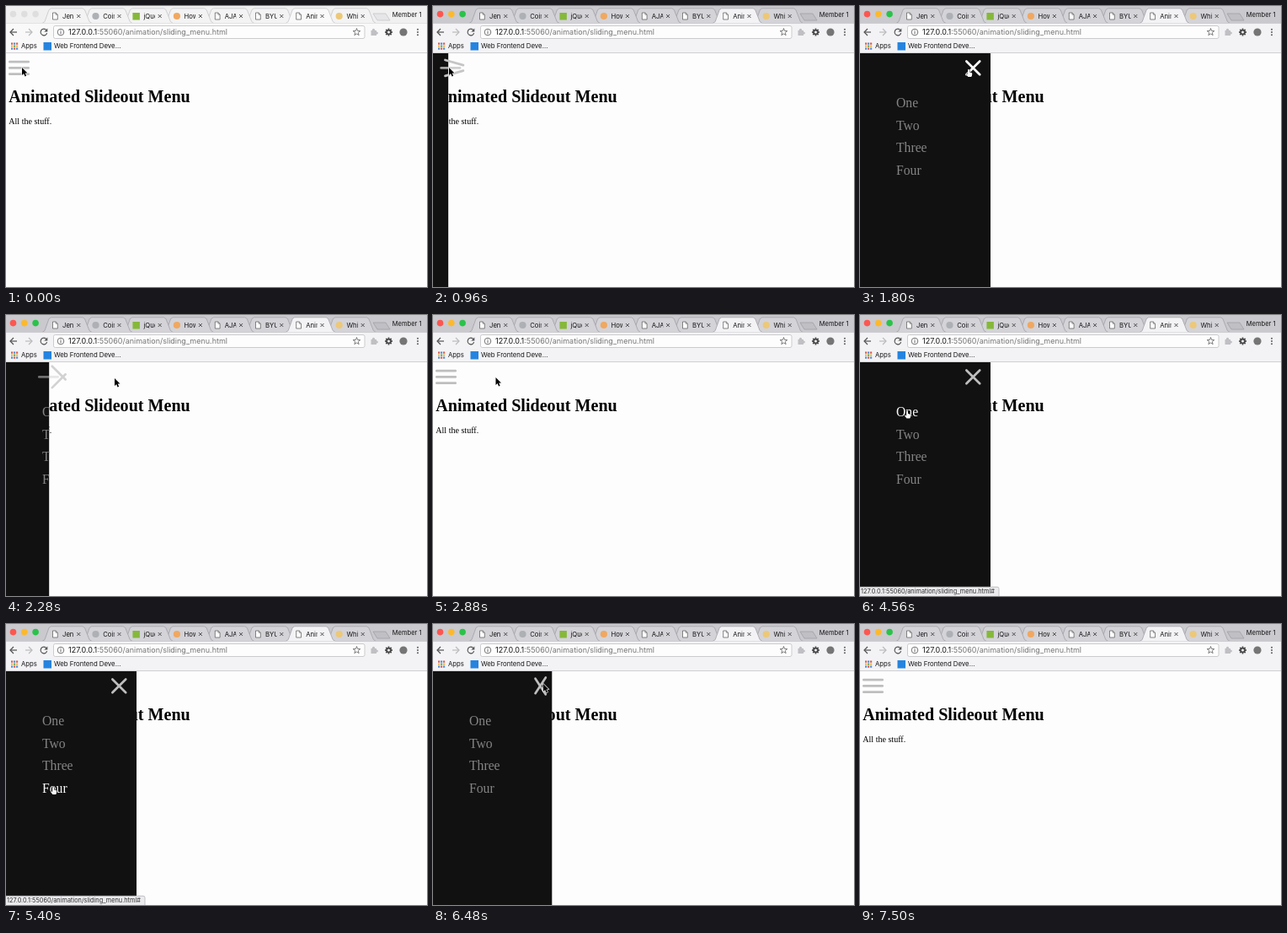
Recreate the animation shown at these times as an HTML page with a canvas. Size 500 by 333 pixels, loop 7560 ms.

```html
<!DOCTYPE html>
<html lang="en">
<head>
<meta charset="utf-8">
<title>Animated Slideout Menu</title>
<style>
html, body { margin: 0; width: 100%; height: 100%; overflow: hidden; background: #fdfdfd; }
canvas { display: block; width: 500px; height: 333px; }
</style>
</head>
<body>
<canvas id="stage"></canvas>
<script>
const W = 500, H = 333, LOOP = 7560, STEP = 60, SLIDE = 500, MENU_W = 155;
const UI = 'Inter, "Open Sans", sans-serif';
const SERIF = '"Liberation Serif", "Times New Roman", serif';
const INK = '#161616', MUTED = '#757575', GLYPH = '#525252';
const URL_HOST = '127.0.0.1', URL_PATH = ':55060/animation/sliding_menu.html';

const canvas = document.getElementById('stage');
const c = canvas.getContext('2d');
const dpr = window.devicePixelRatio || 1;
canvas.width = W * dpr;
canvas.height = H * dpr;

const clamp = v => Math.max(0, Math.min(1, v));
const lerp = (a, b, k) => a + (b - a) * k;
const smooth = k => k * k * (3 - 2 * k);

// Cubic bezier (.42, 0, .58, 1), solved by bisection
function easeInOut(x) {
  if (x <= 0 || x >= 1) return clamp(x);
  let lo = 0, hi = 1, s = 0.5;
  for (let i = 0; i < 18; i++) {
    s = (lo + hi) / 2;
    const bx = 3 * (1 - s) * (1 - s) * s * 0.42 + 3 * (1 - s) * s * s * 0.58 + s * s * s;
    if (bx < x) lo = s; else hi = s;
  }
  return s * s * (3 - 2 * s);
}

function gray(a, b, k) {
  const v = Math.round(lerp(a, b, k));
  return `rgb(${v},${v},${v})`;
}

function rect(x, y, w, h, fill) {
  c.fillStyle = fill;
  c.fillRect(x, y, w, h);
}

function disc(x, y, r, fill) {
  c.fillStyle = fill;
  c.beginPath();
  c.arc(x, y, r, 0, Math.PI * 2);
  c.fill();
}

function box(x, y, w, h, r, fill, stroke) {
  c.beginPath();
  c.roundRect(x, y, w, h, r);
  paint(fill, stroke);
}

function paint(fill, stroke, width = 0.8) {
  if (fill) { c.fillStyle = fill; c.fill(); }
  if (stroke) { c.strokeStyle = stroke; c.lineWidth = width; c.stroke(); }
}

function path(points, close) {
  c.beginPath();
  points.forEach(([x, y], i) => i ? c.lineTo(x, y) : c.moveTo(x, y));
  if (close) c.closePath();
}

function line(points, color, width) {
  path(points);
  paint(null, color, width);
}

function text(s, x, y, font, fill, align = 'left') {
  c.font = font;
  c.fillStyle = fill;
  c.textAlign = align;
  c.fillText(s, x, y);
  return c.measureText(s).width;
}

// ---- Timeline ----
const ACTIVATE = 720;
const TOGGLES = [840, 1980, 3383, 6377];

function openness(t) {
  let p = 0;
  TOGGLES.forEach((start, i) => {
    if (t >= start) {
      const k = easeInOut((t - start) / SLIDE);
      p = i % 2 ? 1 - k : k;
    }
  });
  return p;
}

// time, x, y of the pointer tip
const POINTER = [
  [0, 19, 73], [1260, 19, 73], [1680, 129, 75], [2640, 129, 75],
  [3120, 20, 73], [3600, 20, 73], [3840, 23, 73], [4080, 30, 80],
  [4440, 56, 112], [4620, 56, 114], [4740, 56, 139], [4860, 56, 141],
  [4980, 56, 166], [5100, 56, 168], [5280, 56, 193], [5580, 56, 193],
  [6060, 131, 71], [6780, 131, 71], [7140, 190, -16]
];

function pointerAt(t) {
  const i = POINTER.findIndex(k => k[0] > t);
  if (i < 0) return [190, -16];
  const a = POINTER[i - 1], b = POINTER[i];
  const k = smooth((t - a[0]) / (b[0] - a[0]));
  return [lerp(a[1], b[1], k), lerp(a[2], b[2], k)];
}

// ---- Browser frame ----
const TABS = [
  ['Jen', 'doc'], ['Coin', '#adb0b4'], ['jQue', '#86b83a'], ['How', '#f0a860'],
  ['AJA', 'doc'], ['BYU', 'doc'], ['Anim', 'doc'], ['Whi', '#ecc878']
];
const ACTIVE = { strip: '#c9c9ce', tab: '#d3d3d8', front: '#f3f3f6', edge: '#a0a0a6', plus: '#bfbfc4' };
const IDLE = { strip: '#f0f0f1', tab: '#f3f3f4', front: '#f9f9fa', edge: '#c6c6c8', plus: '#e6e6e8' };

function docIcon(x, y) {
  path([[x - 2.8, y - 4], [x + 0.8, y - 4], [x + 3, y - 1.8], [x + 3, y + 4], [x - 2.8, y + 4]], true);
  paint('#fdfdfd', '#666');
  line([[x + 0.8, y - 4], [x + 0.8, y - 1.8], [x + 3, y - 1.8]], '#666', 0.7);
}

function drawTab(i, skin) {
  const x = 47 + i * 48.2, [label, icon] = TABS[i];
  path([[x - 4, 20.5], [x - 1, 18.5], [x + 4, 4.5], [x + 6.5, 2.8],
        [x + 44, 2.8], [x + 46.5, 4.5], [x + 52, 18.5], [x + 55, 20.5]]);
  paint(i === 6 ? skin.front : skin.tab, skin.edge);
  if (icon === 'doc') docIcon(x + 11.3, 12);
  else if (i === 2) rect(x + 7, 8, 8.5, 8.5, icon);
  else disc(x + 11.3, 12, 4.1, icon);
  c.save();
  c.beginPath();
  c.rect(x + 19, 4, 14.5, 16);
  c.clip();
  text(label, x + 20, 14.8, '7.7px ' + UI, INK);
  c.restore();
  const m = x + 39.3;
  line([[m - 2, 10], [m + 2, 14]], GLYPH, 1);
  line([[m + 2, 10], [m - 2, 14]], GLYPH, 1);
}

function arrowIcon(x, dir, color) {
  line([[x - 4 * dir, 31], [x + 4 * dir, 31]], color, 1.2);
  line([[x, 27], [x + 4 * dir, 31], [x, 35]], color, 1.2);
}

function drawToolbar(skin) {
  rect(0, 20.5, W, 35.5, skin.front);
  arrowIcon(9, -1, GLYPH);
  arrowIcon(27, 1, '#bbb');
  c.beginPath();
  c.arc(45, 31, 3.8, 0.3, 5.5);
  paint(null, GLYPH, 1.2);
  path([[49.3, 26.5], [49.3, 30.5], [45.4, 30.5]], true);
  paint(GLYPH);

  box(56.5, 23.5, 369.5, 15, 2, '#fdfdfd', '#c0c0c3');
  c.beginPath();
  c.arc(65, 31, 3.8, 0, Math.PI * 2);
  paint(null, '#666', 0.9);
  rect(64.5, 30.3, 1, 2.9, '#666');
  rect(64.5, 28.6, 1, 1, '#666');
  const w = text(URL_HOST, 74, 34.2, '9px ' + UI, INK);
  text(URL_PATH, 74 + w, 34.2, '9px ' + UI, MUTED);

  const star = [];
  for (let i = 0; i < 10; i++) {
    const a = -Math.PI / 2 + i * Math.PI / 5, r = i % 2 ? 1.9 : 4.5;
    star.push([416.5 + r * Math.cos(a), 31 + r * Math.sin(a)]);
  }
  path(star, true);
  paint(null, '#606060');

  // Extensions and overflow menu
  rect(433.5, 29, 6.5, 6, '#c0c0c4');
  disc(436.5, 28.3, 1.6, '#c0c0c4');
  disc(440.3, 32, 1.6, '#c0c0c4');
  for (let i = 0; i < 8; i++) {
    const a = i * Math.PI / 4;
    line([[454.5, 31], [454.5 + 4.5 * Math.cos(a), 31 + 4.5 * Math.sin(a)]], '#484848', 1.7);
  }
  disc(454.5, 31, 3.3, '#484848');
  disc(454.5, 31, 1.5, skin.front);
  disc(472, 31, 4.6, '#757575');
  for (let i = -1; i < 2; i++) disc(489, 31 + i * 3.2, 0.95, GLYPH);

  // Bookmarks
  const dots = ['#e05a4c', '#6fa858', '#4a8fd8', '#e8b84c'];
  for (let i = 0; i < 9; i++) {
    const row = Math.floor(i / 3);
    rect(6 + (i % 3) * 3, 43.5 + row * 3, 2.2, 2.2, dots[(i * 2 + row) % 4]);
  }
  text('Apps', 18, 50.4, '7.7px ' + UI, INK);
  rect(44.5, 43, 9.5, 9.5, '#2484e0');
  text('Web Frontend Deve...', 57, 50.4, '7.8px ' + UI, INK);
  rect(0, 55.2, W, 0.8, '#c8c8cb');
}

function drawBrowser(active) {
  const skin = active ? ACTIVE : IDLE;
  rect(0, 0, W, 21, skin.strip);
  ['#fc5650', '#fdb92c', '#2bc24a'].forEach((color, i) =>
    disc(8.5 + i * 13.3, 9.6, 3.8, active ? color : '#dededf'));
  for (let i = TABS.length - 1; i >= 0; i--) if (i !== 6) drawTab(i, skin);
  path([[436, 9], [451, 9], [456, 17], [441, 17]], true);
  paint(skin.plus, skin.edge);
  rect(0, 20, W, 0.8, skin.edge);
  drawTab(6, skin);
  text('Member 1', 493.5, 12.6, '7.5px ' + UI, INK, 'right');
  drawToolbar(skin);
}

// ---- Page ----
const ITEMS = ['One', 'Two', 'Three', 'Four'];

function drawPage() {
  rect(0, 56, W, H - 56, '#fdfdfd');
  text('Animated Slideout Menu', 3.3, 114.3, 'bold 20.1px ' + SERIF, '#000');
  text('All the stuff.', 3.3, 140.3, '10.05px ' + SERIF, '#000');
}

function itemGlow(i, x, y, p) {
  if (p < 0.95 || x < 35 || x > 85) return 0;
  return clamp((14 - Math.abs(y + 3 - (115 + i * 26.8))) / 4);
}

function drawMenu(p, x, y) {
  const w = MENU_W * p;
  if (w <= 0) return;
  c.save();
  c.beginPath();
  c.rect(0, 56, w, H - 56);
  c.clip();
  rect(0, 56, w, H - 56, '#111');
  ITEMS.forEach((label, i) => {
    text(label, 43, 119.8 + i * 26.8, '15.7px ' + SERIF, gray(132, 250, itemGlow(i, x, y, p)));
  });
  c.restore();
}

function bar(x, y, angle, color) {
  c.save();
  c.translate(x, y);
  c.rotate(angle);
  box(-12.5, -1.35, 25, 2.7, 1.3, color);
  c.restore();
}

// The icon trails the menu edge slightly while its bars turn with the menu
function drawIcon(t) {
  const p = openness(t), slide = openness(t - 20);
  const x = lerp(15.5, 134.3, slide), y = 73.4;
  const bright = p * clamp((4260 - t) / 240);
  const color = gray(190, 250, bright);
  const turn = p * Math.PI * 0.75, gap = 7.2 * (1 - p);
  bar(x, y - gap, turn, color);
  bar(x, y + gap, -turn, color);
  c.globalAlpha = clamp(1 - 1.5 * p);
  bar(x - 37 * p, y, 0, color);
  c.globalAlpha = 1;
}

function drawStatus() {
  box(-3, 322.3, 168, 14, 2, '#ececef', '#b4b4b8');
  text(URL_HOST + URL_PATH + '#', 1, 330.4, '7.35px ' + UI, '#303030');
}

// ---- Pointer ----
const ARROW = [[0, 0], [0, 9], [2.1, 7.1], [3.6, 10.4], [5.1, 9.7], [3.7, 6.5], [6.5, 6.4]];
const HAND = [[-0.9, 0.6], [0, -0.3], [0.9, 0.6], [1.1, 3.4], [3.4, 4], [4.3, 5],
              [4, 7.4], [3.2, 9], [-0.6, 9], [-3, 6], [-2.3, 5], [-0.9, 6]];

function drawPointer(x, y, hand) {
  c.save();
  c.translate(x, y);
  c.lineJoin = 'round';
  path(hand ? HAND : ARROW, true);
  c.fillStyle = hand ? '#fafafa' : '#000';
  c.strokeStyle = hand ? '#000' : '#fafafa';
  c.lineWidth = hand ? 0.8 : 1.3;
  c.stroke();
  c.fill();
  c.restore();
}

function draw(t) {
  c.setTransform(dpr, 0, 0, dpr, 0, 0);
  const [x, y] = pointerAt(t);
  const p = openness(t);
  drawPage();
  drawMenu(p, x, y);
  drawIcon(t);
  drawBrowser(t >= ACTIVATE);
  if (t >= 4500 && t < 5760) drawStatus();
  const onItem = ITEMS.some((_, i) => itemGlow(i, x, y, p) > 0.5);
  const onClose = p > 0.95 && x > 122 && y < 86;
  drawPointer(x, y, onItem || onClose);
}

const begin = performance.now();
function tick() {
  const t = (performance.now() - begin) % LOOP;
  draw(Math.floor(t / STEP) * STEP);
  requestAnimationFrame(tick);
}
tick();
</script>
</body>
</html>
```
